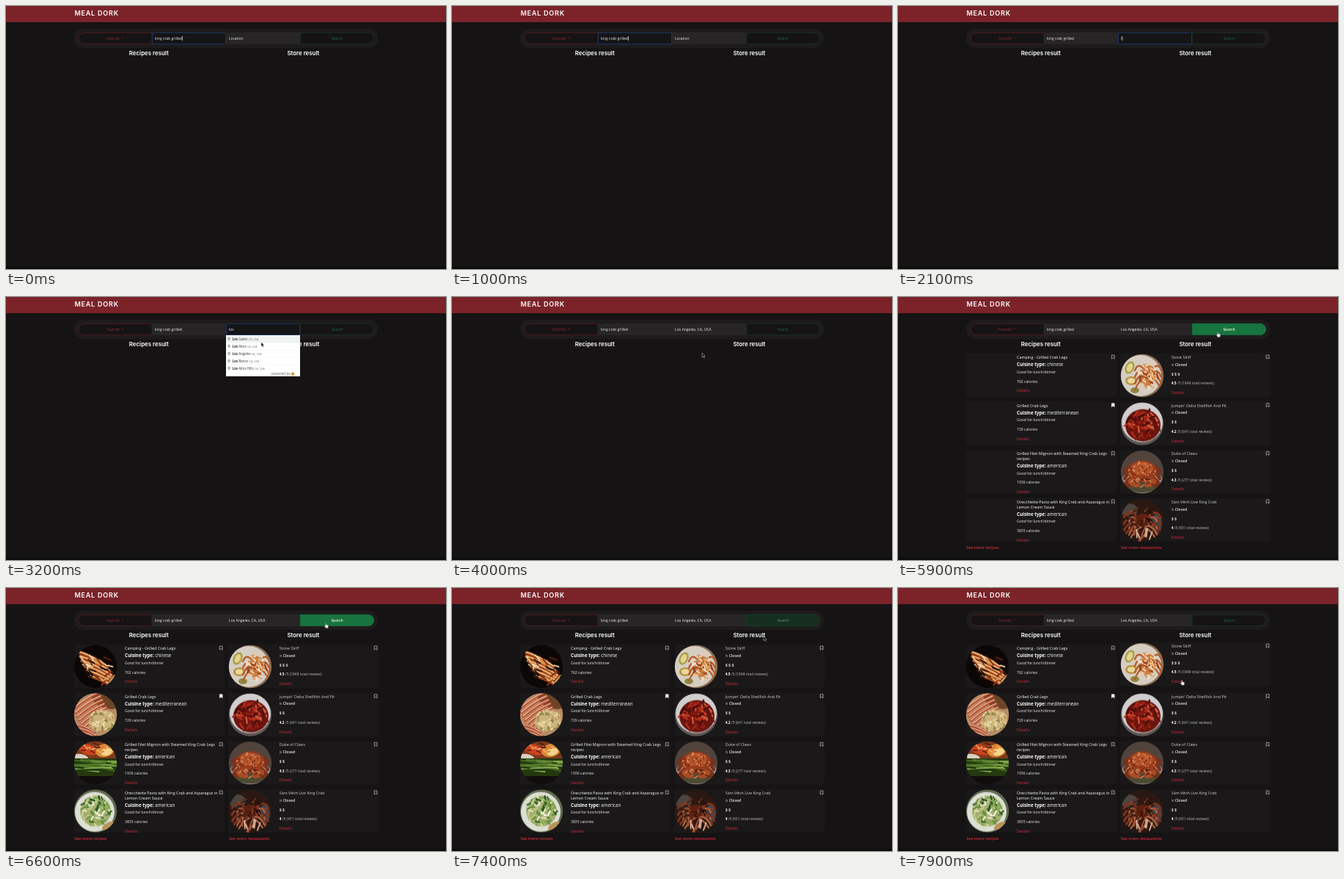
These frames come from a looping animation (600 px wide and 358 px high, 8 s). An HTML page:

```html
<!DOCTYPE html>
<html lang="en">
<head>
<meta charset="utf-8">
<title>Recipe and store search</title>
<style>
html, body { margin: 0; width: 100%; height: 100%; overflow: hidden; background: #151314; }
svg { display: block; width: 100vw; height: 100vh; font-family: "Open Sans", "Noto Sans", sans-serif; }
.head { font-family: Inter, "Open Sans", sans-serif; }

/* 1% = 80 ms */
.step { animation: 8s step-end infinite; }
.ease { animation: 8s linear infinite; }

.nameFocus { animation-name: nameFocus; }
.nameCaret { animation-name: nameCaret; }
.locFocus { animation-name: locFocus; }
.locCaret { animation-name: locCaret; }
.hint { animation-name: hint; }
.typeL { animation-name: typeL; }
.typeO { animation-name: typeO; }
.typeS { animation-name: typeS; }
.picked { animation-name: picked; }
.list { animation-name: list; }
.rowHover { animation-name: rowHover; }
.hot { animation-name: hot; }
.results { animation-name: results; }
.storePic { animation-name: storePic; }
.recipePic { animation-name: recipePic; }
.lift { animation-name: lift; }
.mouse { animation-name: mouse; animation-timing-function: ease-in-out; }
.mouseOn { animation-name: mouseOn; }
.arrow { animation-name: arrow; }
.hand { animation-name: hand; }

@keyframes nameFocus { 0% { opacity: 1 } 23.75%, 100% { opacity: 0 } }
@keyframes nameCaret { 0%, 12.5% { opacity: 1 } 6.25%, 18.75%, 100% { opacity: 0 } }
@keyframes locFocus { 0% { opacity: 0 } 23.75% { opacity: 1 } 48.75%, 100% { opacity: 0 } }
@keyframes locCaret {
  0% { opacity: 0; transform: none }
  23.75% { opacity: 1; transform: none }
  26.25% { opacity: 1; transform: translateX(1.4px) }
  28.75% { opacity: 1; transform: translateX(4.5px) }
  31.25% { opacity: 1; transform: translateX(7.2px) }
  36.25% { opacity: 0; transform: translateX(7.2px) }
  42.5% { opacity: 1; transform: translateX(7.2px) }
  48.75%, 100% { opacity: 0; transform: none }
}
@keyframes hint { 0% { opacity: 1 } 26.25%, 100% { opacity: 0 } }
@keyframes typeL { 0% { opacity: 0 } 26.25% { opacity: 1 } 28.75%, 100% { opacity: 0 } }
@keyframes typeO { 0% { opacity: 0 } 28.75% { opacity: 1 } 31.25%, 100% { opacity: 0 } }
@keyframes typeS { 0% { opacity: 0 } 31.25% { opacity: 1 } 48.75%, 100% { opacity: 0 } }
@keyframes picked { 0% { opacity: 0 } 48.75%, 100% { opacity: 1 } }
@keyframes list { 0% { opacity: 0 } 30% { opacity: 1 } 48.75%, 100% { opacity: 0 } }
@keyframes rowHover {
  0% { opacity: 0; transform: none }
  40% { opacity: 1; transform: none }
  42.5% { opacity: 1; transform: translateY(10px) }
  43.75%, 100% { opacity: 1; transform: translateY(20px) }
}
@keyframes hot { 0%, 57.5% { opacity: 0 } 60%, 91.25% { opacity: 1 } 93%, 100% { opacity: 0 } }
@keyframes results { 0%, 67.5% { opacity: 0 } 72%, 100% { opacity: 1 } }
@keyframes storePic { 0%, 70% { opacity: 0 } 73%, 100% { opacity: 1 } }
@keyframes recipePic { 0%, 75% { opacity: 0 } 78.75%, 100% { opacity: 1 } }
@keyframes lift { 0%, 93.75% { transform: none } 97.5%, 100% { transform: translateY(-3px) } }
@keyframes mouse {
  0%, 40.5% { transform: translate(348px, 61.5px) }
  45%, 54% { transform: translate(341px, 76px) }
  61.25%, 90% { transform: translate(436px, 47.3px) }
  97.5%, 100% { transform: translate(387px, 125px) }
}
@keyframes mouseOn { 0% { opacity: 0 } 40%, 100% { opacity: 1 } }
@keyframes arrow { 0%, 92.5% { opacity: 1 } 58.75%, 96.25%, 100% { opacity: 0 } }
@keyframes hand { 0%, 92.5% { opacity: 0 } 58.75%, 96.25%, 100% { opacity: 1 } }
</style>
</head>
<body>
<svg id="stage" viewBox="0 0 600 358" preserveAspectRatio="none"></svg>
<script>
const RED = '#d42a3c';

// y is the middle of the line
const text = (x, y, s, size, fill, weight = 400, attrs = '') =>
  `<text x="${x}" y="${y + size * 0.36}" font-size="${size}" fill="${fill}" font-weight="${weight}" ${attrs}>${s}</text>`;
const rect = (x, y, w, h, fill, attrs = '') =>
  `<rect x="${x}" y="${y}" width="${w}" height="${h}" fill="${fill}" ${attrs}/>`;
const group = (cls, inner) => `<g class="${cls}">${inner}</g>`;
const bold = s => `<tspan font-weight="700">${s}</tspan>`;

let seed = 7;
const rnd = () => (seed = (seed * 16807) % 2147483647) / 2147483647;

// photo parts, relative to the middle of a round picture
const blob = (x, y, rx, ry, fill, rot = 0) =>
  `<ellipse rx="${rx}" ry="${ry}" fill="${fill}" transform="translate(${x} ${y}) rotate(${rot})"/>`;
const line = (d, width, color) =>
  `<path d="${d}" fill="none" stroke="${color}" stroke-width="${width}" stroke-linecap="round"/>`;

// short marks scattered over an ellipse
function strokes(n, x, y, rx, ry, len, width, angle, spread, colors) {
  let out = '';
  for (let i = 0; i < n; i++) {
    const turn = rnd() * Math.PI * 2, far = Math.sqrt(rnd());
    const a = (angle + (rnd() - 0.5) * spread) * Math.PI / 180;
    const px = x + Math.cos(turn) * far * rx, py = y + Math.sin(turn) * far * ry;
    const dx = Math.cos(a) * len / 2, dy = Math.sin(a) * len / 2;
    out += line(`M${(px - dx).toFixed(1)} ${(py - dy).toFixed(1)}L${(px + dx).toFixed(1)} ${(py + dy).toFixed(1)}`,
      width, colors[i % colors.length]);
  }
  return out;
}

// curved legs fanned out on both sides of a body
function legs(x, y, reach, width, color) {
  let out = '';
  for (const side of [-1, 1])
    for (let i = 0; i < 4; i++) {
      const dy = -12 + i * 9;
      out += line(`M${x} ${y}Q${x + side * reach * 0.7} ${y + dy - 9} ${x + side * reach} ${y + dy + 6}`, width, color);
    }
  return out;
}

// parallel diagonal legs, each with a lit edge
function rack(n, x, y, dx, dy, gap, width, dark, light) {
  let out = '';
  for (let i = 0; i < n; i++) {
    const px = x + i * gap * 0.5, py = y + i * gap;
    const d = `q${dx / 2} ${dy / 2 - 4} ${dx} ${dy}`;
    out += line(`M${px} ${py}${d}`, width, dark) + line(`M${px} ${py - width * 0.2}${d}`, width * 0.4, light);
  }
  return out;
}

const recipePics = [
  () => blob(0, 0, 30, 30, '#0b0706') +
    rack(6, -24, -20, 40, 20, 6.5, 4.6, '#a8481a', '#f0c084') +
    strokes(20, 0, -1, 20, 18, 9, 1.7, 28, 50, ['#fbe4bd', '#d88a42', '#1a0c08']) +
    strokes(14, 0, -2, 22, 18, 10, 1.6, 35, 60, ['#0d0705', '#6b2711']) +
    strokes(6, 17, 16, 8, 8, 10, 2.4, -40, 30, ['#8c3518', '#d59a5a']),
  () => blob(0, 0, 30, 30, '#b78d66') + blob(14, -20, 20, 11, '#6d4428', 20) +
    rack(7, -30, -8, 34, -22, 5.2, 3.8, '#b5452a', '#edbfa2') +
    blob(9, 8, 18, 14, '#cdb27c', -15) +
    strokes(60, 9, 8, 18, 14, 2.4, 1.9, 0, 180, ['#efe1b4', '#b79355', '#7f8040', '#e2cb90']) +
    rack(3, -26, 14, 24, 10, 5, 3.4, '#a94429', '#e8c0a4'),
  () => blob(0, 0, 30, 30, '#1b160f') +
    rect(-30, -30, 60, 24, '#7c3a1c') +
    blob(-10, -18, 14, 7, '#c9431e', 15) + blob(-20, -8, 10, 4, '#d8cfc0', 10) +
    blob(13, -17, 13, 9, '#dc8a32', -12) + blob(15, -15, 8, 5, '#f2d48a', -12) +
    strokes(18, -4, -19, 22, 8, 5, 1.8, 20, 80, ['#e2703a', '#5a2110', '#f0b070']) +
    rect(-30, -6, 60, 24, '#25380f') +
    strokes(24, 0, 5, 18, 10, 36, 2, 4, 16, ['#41661f', '#7fa64a', '#22380f', '#587f2c']) +
    rect(-30, 18, 60, 13, '#0f0e0d'),
  () => blob(0, 0, 30, 30, '#5f6a50') + blob(-1, 1, 27, 27, '#dcdfd4') + blob(0, 0, 21, 21, '#a4b070') +
    strokes(70, 0, 0, 20, 20, 5, 2, 20, 180, ['#efeccb', '#5f8a38', '#cfcf96', '#34602a', '#f6f5e6', '#86a750']) +
    strokes(10, 4, -10, 13, 9, 6, 2.6, 60, 120, ['#28521f', '#7aa046']) + blob(17, 20, 9, 4, '#b8925a', -30)
];

const storePics = [
  () => blob(0, 0, 30, 30, '#8c6e52') + blob(-2, 0, 28, 28, '#d6cdc2') +
    blob(-17, -11, 6, 9, '#a3a048', 25) + blob(-17, -11, 3.8, 6.4, '#e6d28c', 25) +
    blob(-15, 7, 8, 6, '#b8903c') + blob(-15, 7, 5.4, 3.8, '#e8d79c') + blob(-10, 20, 6, 4, '#8a8a42') +
    legs(8, -1, 18, 2.4, '#b5602e') + blob(8, 0, 10, 14, '#c8793e', 10) +
    strokes(50, 8, 0, 14, 18, 5, 1.7, 50, 140, ['#efc596', '#9c421b', '#f4e2cb', '#d88644']),
  () => blob(0, 0, 30, 30, '#5d5654') + blob(0, -2, 28, 27, '#cfcdcd') + blob(1, 2, 24, 22, '#6b150f') +
    strokes(70, 1, 2, 22, 20, 8, 2.4, 25, 160, ['#8e1c12', '#b3301d', '#430b08', '#d0563a', '#6a130d']),
  () => blob(0, 0, 30, 30, '#51443d') + blob(0, 13, 29, 16, '#989690') + blob(0, 17, 23, 11, '#4d4a32') +
    legs(0, 6, 24, 4.4, '#7e2f17') + blob(0, -1, 20, 15, '#963a1b') + blob(0, -5, 15, 9, '#b4522a') +
    strokes(50, 0, -2, 18, 13, 1.6, 1.5, 0, 180, ['#cf7c4c', '#742912', '#a4451f', '#de9a70']) +
    blob(-11, 15, 9, 5, '#a94c25', 25) + blob(11, 15, 9, 5, '#a94c25', -25) +
    strokes(14, 0, 15, 18, 6, 5, 1.5, 0, 120, ['#5c2010', '#d28a60']),
  () => blob(0, 0, 30, 30, '#2b1812') + blob(-18, -14, 12, 9, '#4d443e') + blob(20, 3, 7, 12, '#3b4650') +
    legs(0, 2, 25, 3, '#7c3420') + legs(1, 8, 19, 2, '#b26a48') + blob(0, 0, 10, 9, '#5c2012') +
    strokes(40, 0, 2, 22, 20, 6, 1.5, 60, 160, ['#96492e', '#3a140b', '#6a2918', '#1c0e0a']) +
    strokes(10, 0, 17, 14, 8, 11, 1.8, 90, 70, ['#dcb299', '#a6583a'])
];

const photo = (cls, x, y, draw) =>
  group(cls, `<g transform="translate(${x} ${y})" clip-path="url(#round)">${draw()}</g>`);
const bookmark = (x, y, full) =>
  `<path d="M${x} ${y}h3.8v5l-1.9-1.6-1.9 1.6z" fill="${full ? '#fff' : 'none'}" stroke="#ddd" stroke-width=".6"/>`;

const recipes = [
  ['Camping - Grilled Crab Legs', '', 'chinese', 762],
  ['Grilled Crab Legs', '', 'mediterranean', 729],
  ['Grilled Filet Mignon with Steamed King Crab Legs', 'recipes', 'american', 1936],
  ['Orecchiette Pasta with King Crab and Asparagus in', 'Lemon Cream Sauce', 'american', 3835]
];
const stores = [
  ['Stone Skiff', 3, 4.5, 1848],
  ["Jumpin' Delta Shellfish And Pit", 2, 4.2, 641],
  ['Duke of Claws', 2, 4.3, 277],
  ['Sàm Vênh Live King Crab', 2, 4, 431]
];
const cardTop = i => 77 + i * 65.6;

function recipeCard([title, more, cuisine, calories], i) {
  const y = cardTop(i), d = more ? y + 6.6 : y;
  return rect(93, y, 205, 59.5, '#1a1819', 'rx="3"') +
    photo('ease recipePic', 122, y + 29.8, recipePics[i]) +
    text(162, y + 5.2, title, 5.4, '#fff', 500) +
    (more && text(162, y + 11.8, more, 5.4, '#fff', 500)) +
    text(162, d + 15, `${bold('Cuisine type:')} ${cuisine}`, 6.2, '#fff', 500) +
    text(162, d + 25, 'Good for:lunch/dinner', 5.1, '#eee', 500) +
    text(162, d + 37.7, `${calories} calories`, 5.1, '#eee', 500) +
    text(162, d + 50.4, 'Details', 5.5, RED, 500) +
    bookmark(291.3, y + 2.2, i === 1);
}

function storeCard([title, price, score, reviews], i) {
  const y = cardTop(i);
  const card = rect(303, y, 205, 59.5, '#1a1819', 'rx="3"') +
    photo('ease storePic', 333, y + 30, storePics[i]) +
    text(372.7, y + 5.3, title, 5.4, '#cfcfcf') +
    text(372.7, y + 15, `is ${bold('Closed')}`, 5, '#c8c8c8') +
    text(372.7, y + 27.9, Array(price).fill('$').join(' '), 5.3, '#e4e4e4', 700) +
    text(372.7, y + 40.6, `<tspan font-weight="700" fill="#fff">${score}</tspan> /5 (${reviews} total reviews)`, 4.9, '#c0c0c0') +
    text(372.7, y + 53.1, 'Details', 5.5, RED, 500) +
    bookmark(502.2, y + 2.2, false);
  return i ? card : group('ease lift', card);
}

const results = recipes.map(recipeCard).join('') + stores.map(storeCard).join('') +
  text(93.3, 340.8, 'See more recipes', 5.4, RED, 600) +
  text(303.8, 340.8, 'See more restaurants', 5.4, RED, 600);

const input = x => rect(x, 36, 101, 16, '#272526');
const focus = x => rect(x + 0.4, 36.4, 100.2, 15.4, '#151417', 'rx="1.5" stroke="#1f3d7c" stroke-width=".8"');
const caret = (cls, x) => rect(x, 41, 0.6, 6.4, '#fff', `class="step ${cls}"`);
const typed = (cls, s) => group('step ' + cls, text(304, 44, s, 5.1, '#eee'));
const searchShape = 'M401.4 36.4H494A7.6 7.6 0 0 1 494 51.6H401.4Z';

const bar = rect(93, 31, 414, 26, '#1e1b1c', 'rx="12"') +
  `<path d="M199 36.4H106.4A7.6 7.6 0 0 0 106.4 51.6H199Z" fill="#151314" stroke="#701d23" stroke-width=".6"/>` +
  text(137, 44, 'Favorite', 4.8, '#9a2831') +
  `<path d="M157.8 44l1.2-1.3 1.2 1.3" fill="none" stroke="#9a2831" stroke-width=".6"/>` +
  input(199) + input(300) +
  group('step nameFocus', focus(199) + caret('nameCaret', 240.3)) +
  text(203, 44, 'king crab grilled', 5, '#eee') +
  group('step locFocus', focus(300)) +
  group('step hint', text(304, 44, 'Location', 4.9, '#eee')) +
  typed('typeL', 'l') + typed('typeO', 'lo') + typed('typeS', 'los') +
  typed('picked', 'Los Angeles, CA, USA') +
  caret('locCaret', 304.4) +
  `<path d="${searchShape}" fill="#151314" stroke="#1b412e" stroke-width=".6"/>` +
  text(451.5, 44, 'Search', 5, '#1f6b42', 400, 'text-anchor="middle"') +
  group('ease hot', `<path d="${searchShape}" fill="#18743f" stroke="#18743f" stroke-width=".8"/>` +
    text(451.5, 44, 'Search', 5, '#f3f1cf', 600, 'text-anchor="middle"'));

const places = ['Gatos', 'Altos', 'Angeles', 'Banos', 'Altos Hills'];
const row = (place, i) => {
  const y = 57.2 + i * 9.95;
  return `<path d="M304 ${y + 2.6}c-3-3.4-1.6-5 0-5s3 1.6 0 5z" fill="#a5a5a5"/><circle cx="304" cy="${y - 0.9}" r=".6" fill="#fff"/>` +
    text(308.4, y, `${bold('Los')} ${place} <tspan font-size="3.8" fill="#777">CA, USA</tspan>`, 4.5, '#333') +
    (i ? rect(300, y - 5.1, 101, 0.3, '#e4e4e4') : '');
};
const list = rect(300, 52, 101, 56, '#fff') +
  rect(300, 52, 101, 10, '#eff4f2', 'class="step rowHover"') +
  places.map(row).join('') +
  text(362, 104.6, 'powered by', 4.7, '#666') +
  '<circle cx="391" cy="104.7" r="2.4" fill="#e0a13a"/>';

const mouse = group('step mouseOn', group('ease mouse',
  '<path class="step arrow" d="M0 0V6L1.5 4.7 2.5 7 3.4 6.6 2.4 4.4H4.2Z" fill="#0a0a0a" stroke="#fff" stroke-width=".4"/>' +
  '<path class="step hand" d="M-.6.4q.6-.7 1.2 0V2.6l2.4.7q.9.3.8 1.3L3.2 7.3H0L-2.1 4.4q.1-1 1-.4l.5.5z" fill="#fff" stroke="#111" stroke-width=".4"/>'));

document.getElementById('stage').innerHTML =
  '<defs><clipPath id="round"><circle r="29.2"/></clipPath></defs>' +
  rect(0, 0, 600, 358, '#151314') +
  rect(0, 0, 600, 22, '#7b2329') +
  rect(0, 355.5, 600, 2.5, '#0d0c0c') +
  group('head', text(93.4, 10.2, 'MEAL DORK', 9, '#fff', 600, 'letter-spacing=".8"') +
    text(194.8, 64.3, 'Recipes result', 7.9, '#fff', 600, 'text-anchor="middle"') +
    text(405.4, 64.3, 'Store result', 7.9, '#fff', 600, 'text-anchor="middle"')) +
  bar + group('ease results', results) + group('step list', list) + mouse;
</script>
</body>
</html>
```
